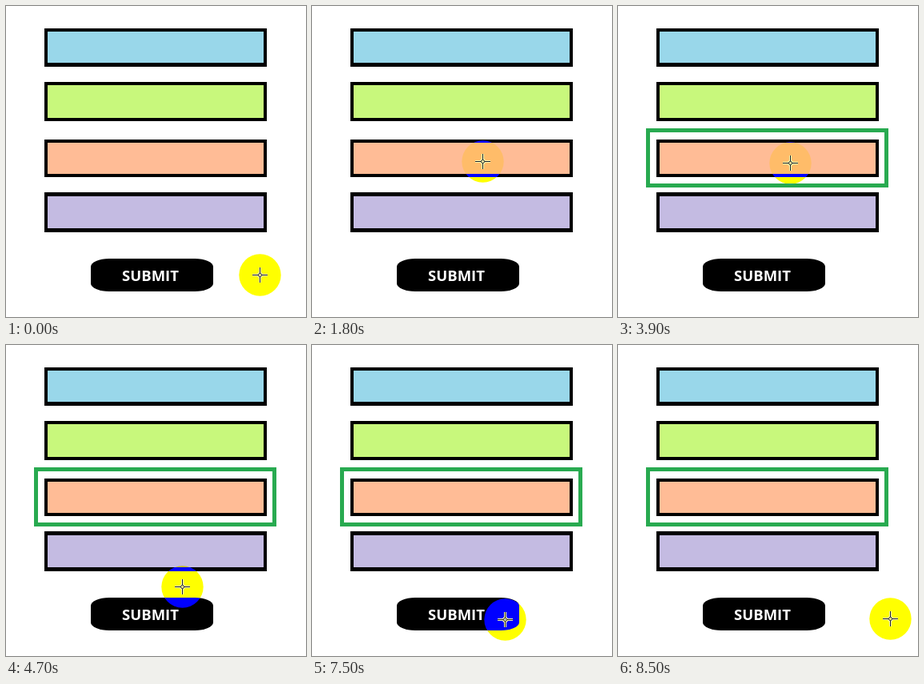
Recreate the animation shown at these times as an HTML page. Size 375 px wide and 389 px high, loop 10 s.

```html
<!DOCTYPE html>
<html lang="en">
<head>
<meta charset="utf-8">
<title>Form and pointer</title>
<style>
  html, body { margin: 0; width: 100%; height: 100%; overflow: hidden; background: #fff; }
  svg { display: block; width: 375px; height: 389px; isolation: isolate; }
  .label { font: 700 18.5px "Open Sans", "Noto Sans", sans-serif; fill: #fff; text-anchor: middle; }
  .spot { fill: #00f; mix-blend-mode: difference; }
  .halo { stroke: #ffffb4; stroke-width: 3; }
  .line { stroke: #1c1c24; stroke-width: 1; }
</style>
</head>
<body>
<svg viewBox="0 0 375 389">
  <defs>
    <g id="cross" fill="none">
      <path d="M.5-9V-2M.5 3V10M-9 .5H-2M3 .5H10"/>
      <circle cx=".5" cy=".5" r="2"/>
    </g>
  </defs>
  <rect width="375" height="389" fill="#fff"/>
  <rect x="48" y="28" width="278" height="48"/>
  <rect x="52" y="32" width="270" height="39" fill="#99d7ea"/>
  <rect x="48" y="95" width="278" height="49"/>
  <rect x="52" y="99" width="270" height="41" fill="#c8f87c"/>
  <rect x="48" y="167" width="278" height="47"/>
  <rect x="52" y="171" width="270" height="39" fill="#ffbc96"/>
  <rect x="48" y="233" width="278" height="50"/>
  <rect x="52" y="238" width="270" height="40" fill="#c4bbe2"/>
  <rect id="frame" x="37.5" y="155.5" width="298" height="69" fill="none" stroke="#28aa50" stroke-width="5"/>
  <rect x="106" y="316" width="153" height="41" rx="23" ry="10"/>
  <text class="label" x="180.5" y="344">SUBMIT</text>
  <circle class="spot mover" cx=".5" cy=".5" r="26.2"/>
  <g class="mover">
    <use class="halo" href="#cross"/>
    <use class="line" href="#cross"/>
  </g>
</svg>
<script>
  const LOOP = 10000, TICK = 100;
  const frame = document.getElementById("frame");
  const movers = document.querySelectorAll(".mover");

  const linear = p => p;
  const smooth = p => p * p * (3 - 2 * p);
  const cubicIn = p => p ** 3;
  const softOut = p => p * (1.3 - 0.3 * p);

  const home = { x: 317, y: 336 };
  const moves = [
    { start: 800, end: 1800, x: 213, y: 194, ease: smooth },
    { start: 3700, end: 4700, x: 220, y: 302, easeX: linear, ease: cubicIn },
    { start: 4800, end: 5100, x: 214, y: 341, ease: softOut },
    { start: 5900, end: 5900, x: 228, y: 341, ease: linear },
    { start: 6400, end: 6500, x: 232, y: 341, ease: linear },
    { start: 6700, end: 7000, x: 228, y: 341, ease: smooth },
    { start: 7500, end: 8500, x: 340, y: 342, ease: softOut, sag: 7 }
  ];

  // Share of a stepped change done at t; the first step shows at its start
  const progress = (t, start, end) =>
    Math.max(0, Math.min(1, (t - start + TICK) / (end - start + TICK)));

  function pointerAt(t) {
    let { x, y } = home;
    for (const m of moves) {
      const p = progress(t, m.start, m.end);
      x += (m.x - x) * (m.easeX || m.ease)(p);
      y += (m.y - y) * m.ease(p) + (m.sag || 0) * Math.sin(Math.PI * p);
    }
    return [Math.round(x), Math.round(y)];
  }

  function draw(now) {
    const t = Math.floor((now % LOOP) / TICK) * TICK;
    const [x, y] = pointerAt(t);
    movers.forEach(m => m.setAttribute("transform", `translate(${x} ${y})`));
    frame.setAttribute("opacity", progress(t, 3100, 3400));
  }

  const start = performance.now();
  function loop() {
    draw(performance.now() - start);
    requestAnimationFrame(loop);
  }
  loop();
</script>
</body>
</html>
```
